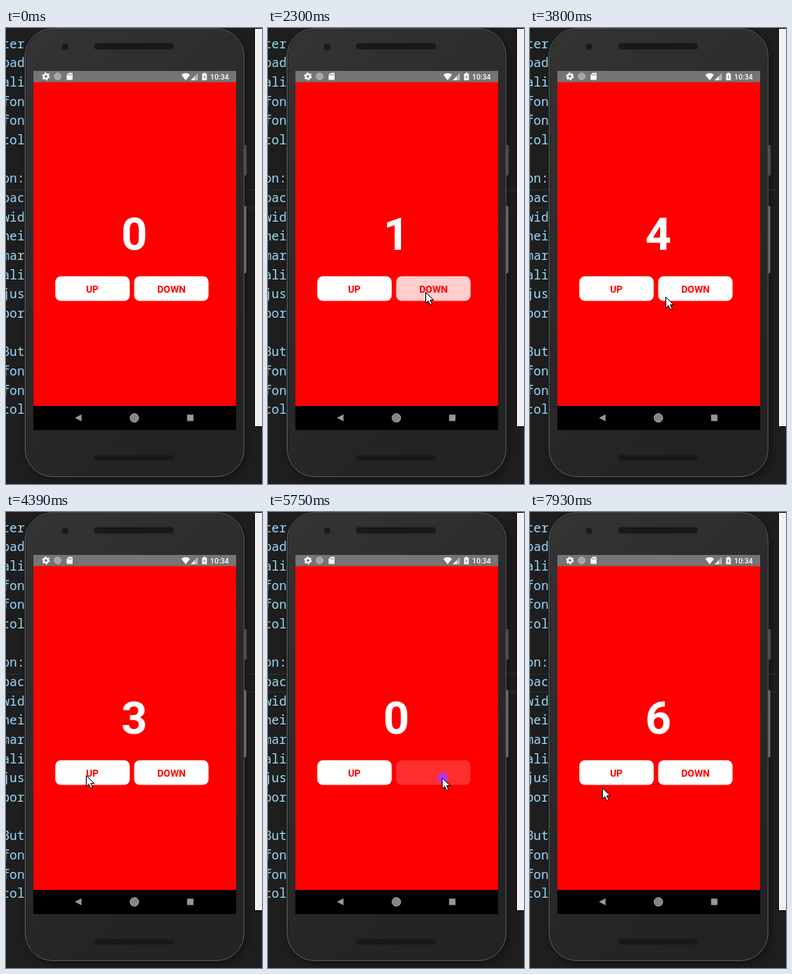
An HTML page that plays this animation: 327 px wide and 584 px high, repeating every 8000 ms.

```html
<!DOCTYPE html>
<html lang="en">
<head>
<meta charset="utf-8">
<title>Counter app</title>
<style>
  html, body { margin: 0; width: 100%; height: 100%; overflow: hidden; background: #1e1e1e; }
  svg { display: block; width: 327px; height: 584px; }
  #code { font: 16px "Noto Sans Mono", monospace; fill: #9cdcfe; white-space: pre; }
  #count { font: bold 58px Roboto, sans-serif; fill: #fff; text-anchor: middle; }
  .label { font: bold 12.4px Roboto, sans-serif; fill: #f00; text-anchor: middle; }
  .clock { font: 500 9.4px Roboto, sans-serif; fill: #fff; }
</style>
</head>
<body>
<svg viewBox="0 0 327 584">
  <defs>
    <linearGradient id="body" x2=".5" y2="1">
      <stop stop-color="#343434"/><stop offset="1" stop-color="#232323"/>
    </linearGradient>
    <filter id="blur"><feGaussianBlur stdDeviation="5"/></filter>
  </defs>
  <rect width="327" height="584" fill="#1e1e1e"/>
  <path d="M0 207.5H318M0 230.5H318" stroke="#292929" stroke-width="2"/>
  <g id="code"></g>

  <!-- phone -->
  <rect x="27" y="6" width="280" height="572" rx="35" opacity=".4" filter="url(#blur)"/>
  <rect x="317.5" y=".5" width="14" height="510" fill="#f1f1f1" stroke="#050505"/>
  <rect x="303" y="150" width="4.5" height="39" rx="1" fill="#4a4a4a"/>
  <rect x="303" y="228" width="4" height="86" rx="1" fill="#686868"/>
  <rect x="24.5" y="1" width="279.5" height="573.5" rx="35" fill="#232323" stroke="#5c5c5c"/>
  <rect x="26" y="2.5" width="276.5" height="570.5" rx="33.5" fill="url(#body)"/>
  <g fill="#191919" stroke="#222">
    <rect x="112.5" y="19.5" width="102" height="8" rx="4"/>
    <rect x="112.5" y="546.5" width="102" height="8" rx="4"/>
    <circle cx="75.5" cy="24" r="4"/>
  </g>
  <rect x="35" y="55" width="259" height="460"/>
  <rect x="35" y="55" width="259" height="15" fill="#757575"/>
  <rect x="35" y="69.4" width="259" height="414.6" fill="#f00"/>

  <!-- status bar -->
  <circle cx="51" cy="62" r="2.8" fill="none" stroke="#fff" stroke-width="2"/>
  <circle cx="51" cy="62" r="4.3" fill="none" stroke="#fff" stroke-width="1.4" stroke-dasharray="2.2 2.3"/>
  <circle cx="66" cy="62" r="4.3" fill="#a5a5a5" stroke="#c2c2c2" stroke-width=".8"/>
  <path d="M80 57.5H85V66.5H77.5V60Z" fill="#fff"/>
  <path d="M79.8 59v2M81.6 59v2M83.4 59v2" stroke="#757575" stroke-width=".8"/>
  <path d="M224 60Q229.5 55.5 235 60L229.5 67Z" fill="#fff"/>
  <path d="M245 57.5V67H236Z" fill="#b4b4b4"/>
  <path d="M241 62V67H236Z" fill="#fff"/>
  <path d="M252 57.5h3v1h1.5v8.5h-6v-8.5h1.5Z" fill="#fff"/>
  <path d="M254 60l-2 3h1.4l-.4 2.6 2-3.2h-1.3Z" fill="#757575"/>
  <text class="clock" x="260.8" y="65.6">10:34</text>

  <!-- navigation bar -->
  <path d="M88 499.3L96.5 494.8V503.8Z" fill="#989898"/>
  <circle cx="164" cy="499.3" r="5.5" fill="#858585" stroke="#a4a4a4" stroke-width="1"/>
  <rect x="231.3" y="495.2" width="8.2" height="8.2" fill="#989898"/>

  <text id="count" x="164" y="283.5">0</text>
  <g id="up">
    <rect x="63" y="318" width="95" height="31.5" rx="7" fill="#fff"/>
    <text class="label" x="110.3" y="338.7">UP</text>
  </g>
  <g id="down">
    <rect x="163.7" y="318" width="95" height="31.5" rx="7" fill="#fff"/>
    <text class="label" x="211.4" y="338.7">DOWN</text>
  </g>

  <g id="cursor">
    <circle id="dot" cx=".5" cy=".5" r="7" fill="#bd35dc"/>
    <path d="M-.5 .5V14.5L2.7 11.4L5.2 16.6L7.5 15.5L5.2 10.5H9.5Z" fill="#fff" stroke="#000"/>
  </g>
</svg>
<script>
const LOOP = 8000, HOLD = 100, FADE_IN = 50, FADE_OUT = 200, DIM = 0.82;
const el = id => document.getElementById(id);
const clamp = v => Math.max(0, Math.min(1, v));
const ease = v => v < 0.5 ? 2 * v * v : 1 - 2 * (1 - v) ** 2;

const lines = ['ter', 'pad', 'ali', 'fon', 'fon', 'col', '', 'on:', 'bac', 'wid',
  'hei', 'mar', 'ali', 'jus', 'bor', '', 'But', 'fon', 'fon', 'col'];
el('code').innerHTML = lines
  .map((text, i) => `<text x="-5" y="${25.5 + i * 24.68}">${text}</text>`).join('');

// Press start times; in this app UP subtracts and DOWN adds.
const buttons = [
  { node: el('up'), step: -1, presses: [740, 4100, 4560, 4800, 5030] },
  { node: el('down'), step: 1, presses: [1810, 2070, 2330, 2680, 3380, 5700, 5930, 6210, 6500, 7000, 7460] }
];

// Pointer stops: time, x, y
const stops = [
  [90, -12, 400], [520, 104, 337], [860, 104, 337], [1120, 187, 355],
  [1290, 187, 355], [1470, 202, 338], [2800, 202, 338], [3200, 246, 337],
  [3500, 246, 337], [3780, 175, 344], [4040, 103, 337], [5150, 103, 337],
  [5340, 184, 337], [5600, 223, 340], [6620, 223, 340], [6780, 229, 342],
  [7570, 229, 342], [7920, 93, 353]
];

function pointerAt(t) {
  const next = stops.findIndex(s => s[0] > t);
  if (next === 0) return [-40, 400];
  if (next < 0) return stops.at(-1).slice(1);
  const [t0, x0, y0] = stops[next - 1], [t1, x1, y1] = stops[next];
  const k = ease((t - t0) / (t1 - t0));
  return [Math.round(x0 + (x1 - x0) * k), Math.round(y0 + (y1 - y0) * k)];
}

function dimAt(age) {
  return age < HOLD ? clamp(age / FADE_IN) : 1 - ease(clamp((age - HOLD) / FADE_OUT));
}

function draw(now) {
  const t = now % LOOP;
  let count = 0, pressed = false;
  for (const { node, step, presses } of buttons) {
    let dim = 0;
    for (const start of presses) {
      const age = t - start;
      if (age < 0) continue;
      dim = Math.max(dim, dimAt(age));
      if (age >= HOLD) count += step;
      else pressed = true;
    }
    node.setAttribute('opacity', 1 - DIM * dim);
    // The label blends into its button when fully dimmed.
    node.querySelector('text').setAttribute('opacity', 1 - dim ** 4);
  }
  el('count').textContent = count;
  el('dot').setAttribute('visibility', pressed ? 'visible' : 'hidden');
  el('cursor').setAttribute('transform', `translate(${pointerAt(t)})`);
  requestAnimationFrame(draw);
}
requestAnimationFrame(draw);
</script>
</body>
</html>
```
